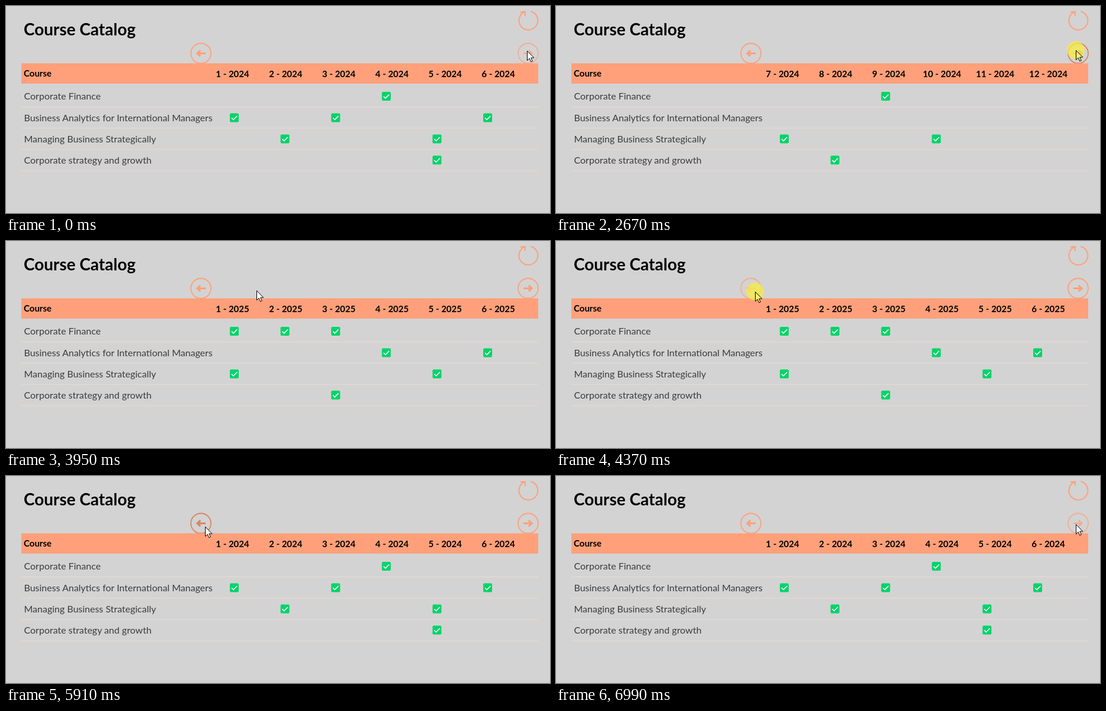
An HTML page that plays this animation: 921x352 px, repeating every 7.73 s.

```html
<!DOCTYPE html>
<html lang="en">
<head>
<meta charset="utf-8">
<title>Course Catalog</title>
<style>
  html, body { margin: 0; width: 100%; height: 100%; overflow: hidden; background: #d3d3d3; }
  svg { display: block; width: 921px; height: 352px; font-family: Lato, sans-serif; }
  .title { font-size: 28px; font-weight: 700; }
  .head { font-size: 15px; font-weight: 700; }
  .row { font-size: 16px; fill: #3c3c3c; }
</style>
</head>
<body>
<svg id="stage" viewBox="0 0 921 352"></svg>
<script>
const LOOP = 7730;
const SALMON = '#ffa07a', PRESSED = '#dc8462';
const ROWS = [
  ['Corporate Finance', 153.5],
  ['Business Analytics for International Managers', 190],
  ['Managing Business Strategically', 226],
  ['Corporate strategy and growth', 262]
];
// One string of ticked columns per row
const PAGES = [
  { month: 1, year: 2024, ticks: ['3', '025', '14', '4'] },
  { month: 7, year: 2024, ticks: ['2', '', '03', '1'] },
  { month: 1, year: 2025, ticks: ['012', '35', '04', '2'] }
];
// Each click: highlight on, button dark, page switch, highlight off, button released
const CLICKS = [
  { side: 'right', on: 1060, press: 1130, turn: 1200, off: 1260, release: 1260, page: 1 },
  { side: 'right', on: 2670, press: 2670, turn: 2810, off: 2870, release: 2870, page: 2 },
  { side: 'left', on: 4370, press: 4440, turn: 4580, off: 4640, release: 4640, page: 1 },
  { side: 'left', on: 5700, press: 5700, turn: 5840, off: 5910, release: 5960, page: 0 }
];

const stage = document.getElementById('stage');

function add(parent, tag, attrs, text) {
  const el = document.createElementNS('http://www.w3.org/2000/svg', tag);
  for (const key in attrs) el.setAttribute(key, attrs[key]);
  if (text) el.textContent = text;
  parent.appendChild(el);
  return el;
}

function addButton(x, flip) {
  const g = add(stage, 'g', {
    transform: `translate(${x} 80.5) scale(${flip} 1)`, fill: 'none', stroke: SALMON
  });
  add(g, 'circle', { r: 17, 'stroke-width': 1.8 });
  add(g, 'path', { d: 'M-.8-5L-6.2 0L-.8 5M-5.5 0H8', 'stroke-width': 3.1 });
  return g;
}

function addPage({ month, year, ticks }) {
  const g = add(stage, 'g', {});
  for (let i = 0; i < 6; i++) {
    add(g, 'text', { class: 'head', x: 383.5 + 90 * i, y: 120.7, 'text-anchor': 'middle' },
      `${month + i} - ${year}`);
  }
  ticks.forEach((columns, r) => {
    for (const c of columns) {
      const box = add(g, 'g', { transform: `translate(${386.5 + 85.8 * c} ${ROWS[r][1]})` });
      add(box, 'rect', { x: -7.5, y: -7.5, width: 15, height: 15, rx: 2, fill: '#00d468' });
      add(box, 'path', {
        d: 'M-4.6 .3L-1.5 3.3L4.8-3', fill: 'none', stroke: '#fff', 'stroke-width': 1.6
      });
    }
  });
  return g;
}

add(stage, 'rect', { width: 921, height: 352, fill: '#d3d3d3' });
add(stage, 'text', { class: 'title', x: 30, y: 49.5 }, 'Course Catalog');
add(stage, 'path', {
  d: 'M888.5 9.2A16 16 0 1 1 878.5 9.8M870.8 10.2L879 9.6L878.6 17',
  fill: 'none', stroke: SALMON, 'stroke-width': 2
});
const buttons = { left: addButton(330, 1), right: addButton(884, -1) };
add(stage, 'rect', { x: 26, y: 97.5, width: 875, height: 34.5, fill: SALMON });
add(stage, 'text', { class: 'head', x: 30, y: 119.8 }, 'Course');
ROWS.forEach(([name, y], i) => {
  add(stage, 'text', { class: 'row', x: 30.5, y: y + 5.5 }, name);
  add(stage, 'rect', { x: 26, y: 171 + 36.2 * i, width: 875, height: 1, fill: '#eadbd0' });
});
const pages = PAGES.map(addPage);
const glow = add(stage, 'circle', { r: 15, fill: '#f5ec42', 'fill-opacity': 0.75 });
const cursor = add(stage, 'path', {
  d: 'M.5.5V16.6L4.2 13.1L6.7 18.8L9.3 17.7L6.8 12.1H11.8Z',
  stroke: '#000', 'stroke-width': 1
});

const mix = (a, b, k) => a + (b - a) * k;

// The pointer moves in discrete steps, as a screen recorder samples it
function pointer(t) {
  if (t < 70) return [882, 76];
  if (t < 3530) return [880, 75];
  if (t < 5960) {
    const u = Math.min(1, Math.floor((t - 3530) / 70) / 11);
    return [mix(337, 760, (1 - u) ** 2), mix(81, 86, u)];
  }
  const u = Math.min(1, (Math.floor((t - 5960) / 68.6) + 1) / 16);
  const s = u ** 0.65;
  return [mix(337, 880, s * s * (3 - 2 * s)), mix(86, 82, u) + 10 * Math.sin(Math.PI * u)];
}

function render(t) {
  let page = 0, lit = false, pressed = '';
  for (const c of CLICKS) {
    if (t >= c.turn) page = c.page;
    if (t >= c.on && t < c.off) lit = true;
    if (t >= c.press && t < c.release) pressed = c.side;
  }
  const hover = t < 3600 || t >= 6700 ? 'right' : t >= 4230 && t < 6030 ? 'left' : '';

  pages.forEach((g, i) => g.setAttribute('display', i === page ? 'inline' : 'none'));
  for (const side in buttons) {
    buttons[side].setAttribute('stroke', side === pressed ? PRESSED : SALMON);
    buttons[side].setAttribute('opacity', side === hover && side !== pressed ? 0.72 : 1);
  }
  const [x, y] = pointer(t);
  const place = `translate(${Math.round(x)} ${Math.round(y)})`;
  cursor.setAttribute('transform', place);
  cursor.setAttribute('fill', lit ? '#f8f07a' : '#fff');
  glow.setAttribute('transform', place);
  glow.setAttribute('display', lit ? 'inline' : 'none');
}

const start = performance.now();
function tick() {
  render((performance.now() - start) % LOOP);
  requestAnimationFrame(tick);
}
tick();
</script>
</body>
</html>
```
